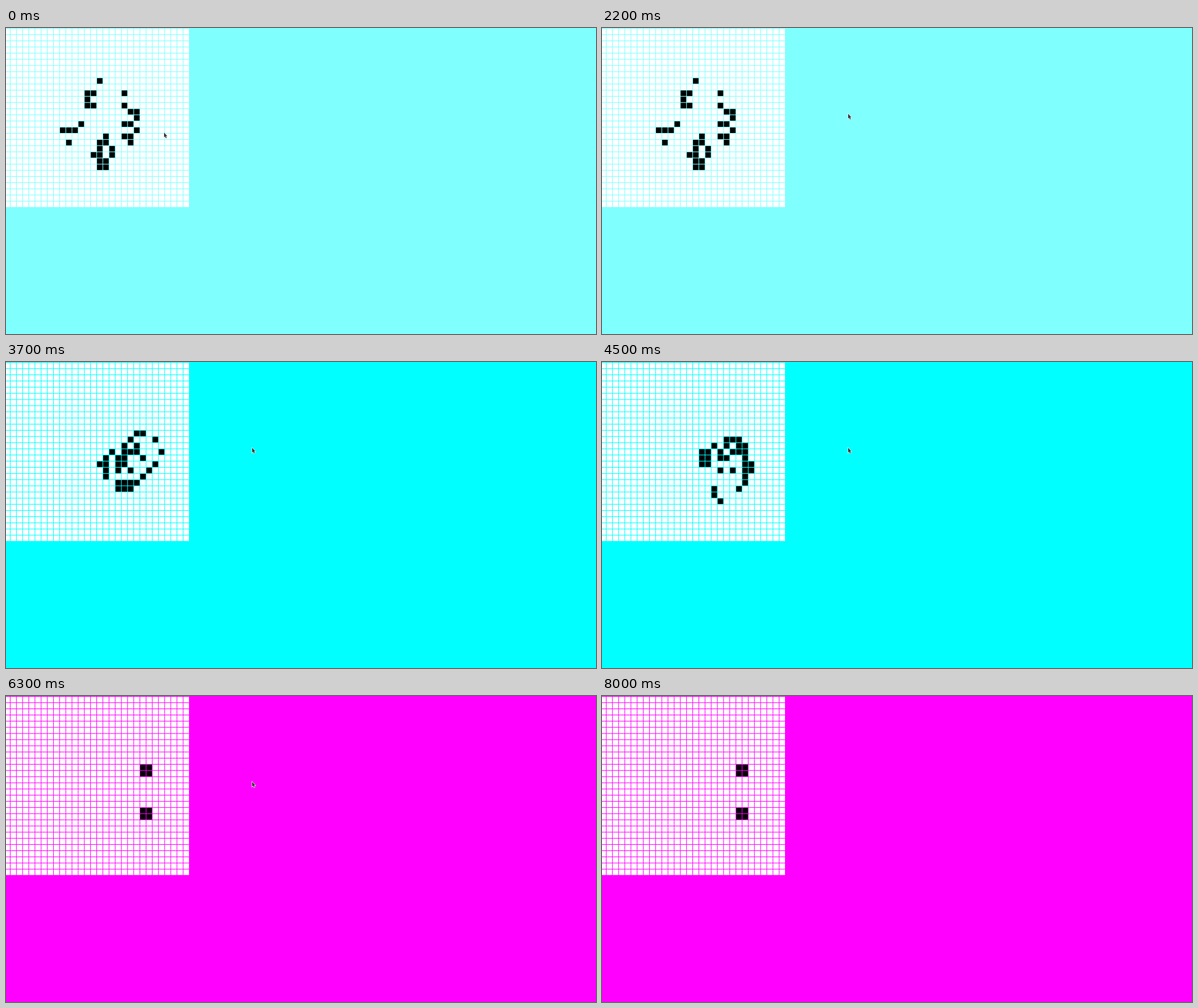
Animation of 1038x539 px, one loop 9500 ms. Source, as an HTML page with a canvas:

```html
<!DOCTYPE html>
<html lang="en">
<head>
<meta charset="utf-8">
<title>Game of Life</title>
<style>
  html, body { margin: 0; width: 100%; height: 100%; overflow: hidden; }
  canvas { display: block; }
</style>
</head>
<body>
<canvas id="stage" width="1038" height="539"></canvas>
<script>
const LOOP = 9500, TICK = 100;
const START = 3100, FINISH = 6300;

// The grid lines fall between pixels, so edges are left to antialiasing
const SIZE = 29, PITCH = 10.863, GAP = 1.086;
const LEFT = 7.45, TOP = 0.86;

// Each trail of live cells: first column, first row, then compass steps
const TRAILS = [
  [14, 8, ""],
  [13, 10, "W S S E"],
  [18, 10, ""],
  [18, 12, "SE E S SW W E SE SW W SE"],
  [11, 15, "SW W W"],
  [9, 18, ""],
  [15, 17, "S SE S SW S W N N W NE N"]
];

// The game slows down in phases: generations, duration
const PHASES = [[9, 600], [5, 750], [5, 1375]];

const ENTRY = { x: 278, y: 184 };
const REST = { x: 433, y: 151 };
const SWING = { x: 380, y: 131 };
const EXIT = { x: 464, y: 111 };
const ARROW = new Path2D("M0 0V8.8L1.9 7.1L3.2 10.2L4.7 9.6L3.4 6.6H5.9Z");

const ctx = document.getElementById("stage").getContext("2d");

const progress = (t, from, length) => Math.min(1, Math.max(0, (t - from) / length));
const mix = (a, b, p) => ({ x: a.x + (b.x - a.x) * p, y: a.y + (b.y - a.y) * p });

function seedBoard() {
  const board = Array.from({ length: SIZE }, () => new Array(SIZE).fill(0));
  for (let [col, row, steps] of TRAILS) {
    board[row][col] = 1;
    for (const step of steps.split(" ")) {
      col += step.includes("E") - step.includes("W");
      row += step.includes("S") - step.includes("N");
      board[row][col] = 1;
    }
  }
  return board;
}

function neighbours(board, row, col) {
  let count = -board[row][col];
  for (let r = row - 1; r <= row + 1; r++)
    for (let c = col - 1; c <= col + 1; c++)
      count += board[r]?.[c] ?? 0;
  return count;
}

function nextBoard(board) {
  return board.map((line, r) => line.map((alive, c) => {
    const n = neighbours(board, r, c);
    return n === 3 || (alive && n === 2) ? 1 : 0;
  }));
}

function generationAt(t) {
  if (t < START) return 0;
  let generation = 1, from = START;
  for (const [count, length] of PHASES) {
    generation += Math.floor(count * progress(t, from, length) + 1e-6);
    from += length;
  }
  return generation;
}

const history = [seedBoard()];
for (let g = 1; g <= generationAt(LOOP); g++) history.push(nextBoard(history[g - 1]));

function backgroundAt(t) {
  if (t < START) return "#80ffff";
  return t < FINISH ? "#00ffff" : "#ff00ff";
}

function pointerAt(t) {
  if (t < 7600) return mix(ENTRY, REST, progress(t, 1500, 300));
  const p = progress(t, 7600, 300);
  return mix(mix(REST, SWING, p), mix(SWING, EXIT, p), p);
}

function drawBoard(board) {
  const side = PITCH - GAP;
  for (let r = 0; r < SIZE; r++) {
    // column -1 is cut off by the left edge
    for (let c = -1; c < SIZE; c++) {
      ctx.fillStyle = board[r][c] ? "#000" : "#fff";
      ctx.fillRect(LEFT + PITCH * c + GAP / 2, TOP + PITCH * r + GAP / 2, side, side);
    }
  }
}

function drawPointer({ x, y }) {
  ctx.save();
  ctx.translate(x, y);
  ctx.lineWidth = 1.2;
  ctx.strokeStyle = "#fff";
  ctx.stroke(ARROW);
  ctx.fillStyle = "#3a3a3a";
  ctx.fill(ARROW);
  ctx.restore();
}

function draw(time) {
  const t = Math.floor(time / TICK) * TICK;
  ctx.fillStyle = backgroundAt(t);
  ctx.fillRect(0, 0, 1038, 539);
  drawBoard(history[generationAt(t)]);
  if (t < 8000) drawPointer(pointerAt(t));
}

let origin;
function tick(now) {
  origin ??= now;
  draw((now - origin) % LOOP);
  requestAnimationFrame(tick);
}
draw(0);
requestAnimationFrame(tick);
</script>
</body>
</html>
```
